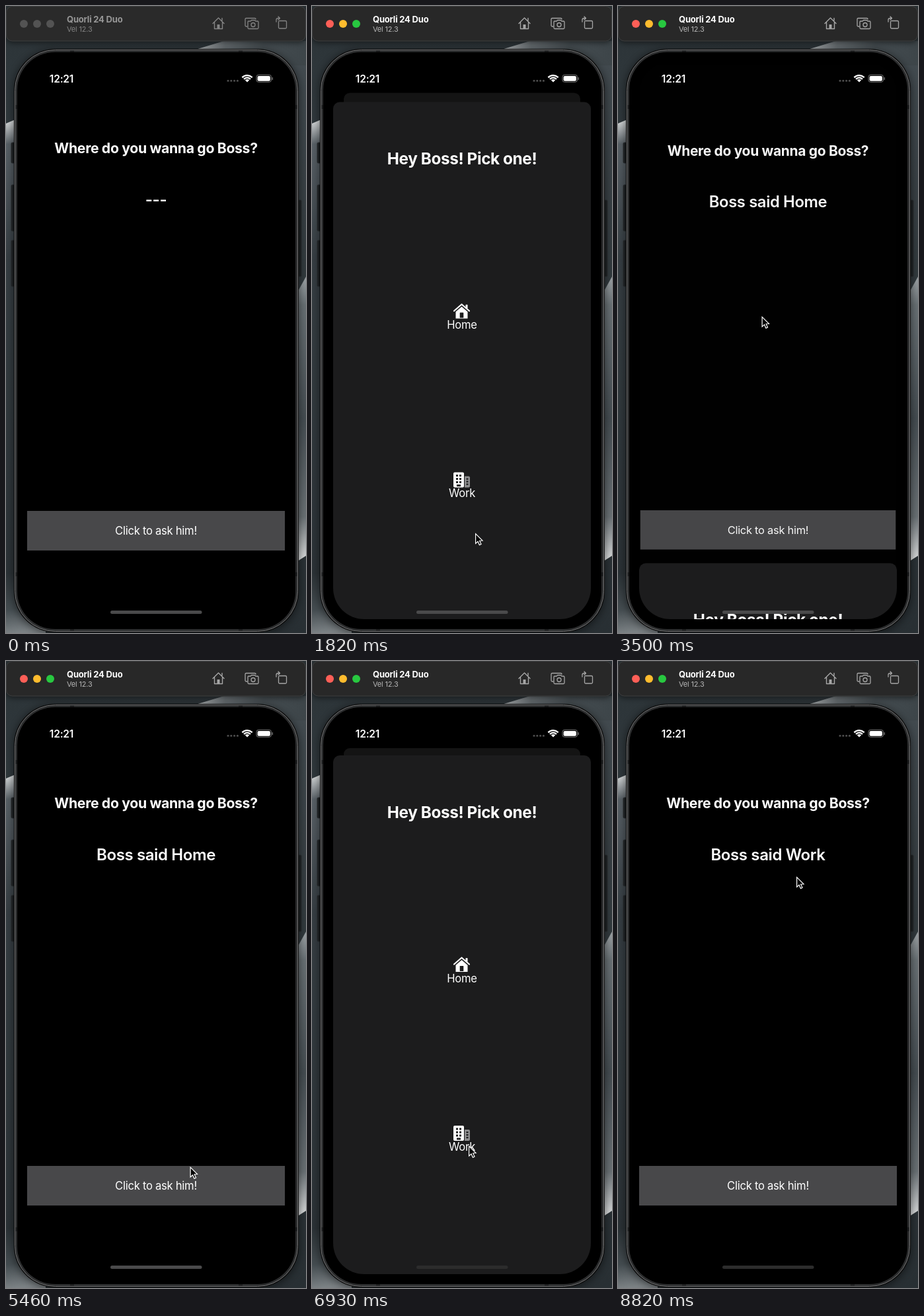
Animation, 454 px wide and 950 px high, one loop 8.89 s. Source, as an HTML page with a canvas:

```html
<!DOCTYPE html>
<html lang="en">
<head>
<meta charset="utf-8">
<title>Pick a place</title>
<style>
html, body { margin: 0; width: 100%; height: 100%; overflow: hidden; background: #000; }
canvas { display: block; width: 100%; height: 100%; }
</style>
</head>
<body>
<canvas id="stage" width="454" height="950"></canvas>
<script>
const ctx = document.getElementById('stage').getContext('2d');
const W = 454, H = 950, LOOP = 8890, STEP = 70;
const MID = 227, TOP = 85, BOTTOM = 929, SHEET_TOP = 143;
const FONT = 'Inter, "Liberation Sans", sans-serif';

const ACTIVATE = 1190;
const OPEN = [1290, 5790];
const CLOSE = [3247, 6967];
const CLICKS = [ACTIVATE, 3010, 5550, 6730];

// Pointer path: time, x, y of the tip
const PATH = [
  [140, 236, 916], [700, 247, 806], [770, 247, 806], [980, 248, 802],
  [1120, 248, 802], [1190, 247, 799], [2030, 247, 799], [2660, 214, 486],
  [2870, 217.5, 470.5], [4200, 217.5, 470.5], [5040, 336, 571], [5460, 278.5, 766.5],
  [5600, 270.5, 788.5], [6090, 270.5, 788.5], [6650, 237, 734.5], [7350, 237, 734.5],
  [7770, 268, 473], [8050, 282, 399], [8120, 282, 399], [8820, 270, 327]
];

function pointer(t) {
  let i = 1;
  while (i < PATH.length - 1 && t > PATH[i][0]) i++;
  const [t0, x0, y0] = PATH[i - 1], [t1, x1, y1] = PATH[i];
  const u = Math.min(1, Math.max(0, (t - t0) / (t1 - t0)));
  const e = smooth(u);
  return [x0 + (x1 - x0) * e, y0 + (y1 - y0) * e];
}

function smooth(u) {
  return u * u * (3 - 2 * u);
}

// Critically damped spring, 0 to 1
function spring(ms) {
  if (ms <= 0) return 0;
  const x = ms * 0.015;
  return 1 - (1 + x) * Math.exp(-x);
}

function shown(t) {
  return OPEN.reduce((p, start, i) => p + spring(t - start) - spring(t - CLOSE[i]), 0);
}

function box(x, y, w, h, r, fill) {
  ctx.beginPath();
  ctx.roundRect(x, y, w, h, r);
  if (fill) { ctx.fillStyle = fill; ctx.fill(); }
}

function disc(x, y, r, fill) {
  ctx.beginPath();
  ctx.arc(x, y, r, 0, Math.PI * 2);
  ctx.fillStyle = fill;
  ctx.fill();
}

function poly(points, fill) {
  ctx.beginPath();
  points.forEach(([x, y]) => ctx.lineTo(x, y));
  ctx.closePath();
  if (fill) { ctx.fillStyle = fill; ctx.fill(); }
}

function line(d, color, width) {
  ctx.strokeStyle = color;
  ctx.lineWidth = width;
  ctx.lineJoin = ctx.lineCap = 'round';
  ctx.stroke(new Path2D(d));
}

function text(s, x, y, size, weight, color = '#fff', align = 'center') {
  ctx.font = `${weight} ${size}px ${FONT}`;
  ctx.letterSpacing = `${-0.016 * size}px`;
  ctx.textAlign = align;
  ctx.fillStyle = color;
  ctx.fillText(s, x, y);
}

function fade(x0, y0, x1, y1, ...stops) {
  const g = ctx.createLinearGradient(x0, y0, x1, y1);
  stops.forEach(([at, c]) => g.addColorStop(at, c));
  return g;
}

function shaded(blur, paint) {
  ctx.save();
  ctx.shadowColor = 'rgba(0,0,0,0.55)';
  ctx.shadowBlur = blur;
  ctx.shadowOffsetY = 2;
  paint();
  ctx.restore();
}

function wallpaper() {
  ctx.fillStyle = fade(0, 53, 0, H, [0, '#2d3539'], [0.4, '#343c41'], [1, '#282f33']);
  ctx.fillRect(0, 0, W, H);
  poly([[287, 66], [330, 53], [W, 53], [W, 140], [287, 140]],
    fade(290, 60, W, 80, [0, '#b4b8ba'], [0.25, '#6a7175'], [0.6, '#454d51'], [1, '#3d4549']));
  ctx.fillStyle = fade(0, 90, 0, 400, [0, '#424a4f'], [1, '#323a3e']);
  ctx.fillRect(430, 90, 24, 350);
  poly([[0, 178], [14, 172], [40, 170], [40, 860], [0, 860]],
    fade(0, 175, 0, 860, [0, '#d4d7d8'], [0.05, '#596167'], [0.3, '#363e43'], [1, '#2b3236']));
  poly([[0, 860], [60, 860], [60, H], [0, H]],
    fade(0, 860, 14, H, [0, '#2b3236'], [0.6, '#444c50'], [1, '#7c8285']));
  poly([[W, 410], [443, 430], [420, 470], [420, 848], [443, 840], [W, 833]],
    fade(0, 410, 0, 838, [0, '#a0a6a9'], [0.1, '#697175'], [0.5, '#454d52'], [0.85, '#6b7276'], [1, '#dadcdd']));
}

function phoneBody() {
  const key = (x, y, h) => {
    box(x, y, 6, h, 1.5, '#1f2325');
    ctx.strokeStyle = '#2c3133';
    ctx.lineWidth = 1;
    ctx.stroke();
  };
  key(8, 207, 31);
  key(8, 271, 70);
  key(8, 355, 70);
  key(441, 294, 116);
  shaded(14, () => box(12, 65, 431, 884, 62, '#0b0b0b'));
  box(13.5, 66.5, 428, 881, 61, '#2c2d2e');
  ctx.strokeStyle = '#737475';
  ctx.lineWidth = 1;
  ctx.stroke();
  ctx.fillStyle = '#1d1e1f';
  for (const x of [97, 352]) { ctx.fillRect(x, 67, 6, 3); ctx.fillRect(x, 944, 6, 3); }
  for (const y of [150, 858]) { ctx.fillRect(14, y, 3, 6); ctx.fillRect(438, y, 3, 6); }
  box(17, 70, 421, 874, 57, '#000');
}

function toolbar(active) {
  shaded(10, () => box(0, 0, W, 53.5, 9, active ? '#282828' : '#2a2a2a'));
  box(0.5, 0.5, W - 1, 52.5, 9);
  ctx.strokeStyle = '#3c3e3f';
  ctx.lineWidth = 1;
  ctx.stroke();
  const lights = active ? ['#fe5f57', '#febc2e', '#28c840'] : ['#535353', '#535353', '#535353'];
  lights.forEach((c, i) => disc(27 + 20 * i, 27, 6, c));
  text('Quorli 24 Duo', 92, 25, 13, 700, active ? '#fff' : '#979797', 'left');
  text('Vel 12.3', 92, 39, 11, 400, active ? '#b5b5b5' : '#828282', 'left');
  const c = active ? '#a6a6a6' : '#848484';
  line('M313 26.5L321.500 18L330 26.500M315.500 25V34.500H327.500V25M327 22V18.500', c, 1.4);
  box(319.5, 28, 4, 6.5, 0.5, c);
  line('M365 31H363.500Q362 31 362 29.500V20Q362 18.500 363.500 18.500H376.500Q378 18.500 378 20', c, 1.3);
  line('M367 23H370L371.500 21.500H376.500L378 23H380.500Q382 23 382 24.500V33Q382 34.500 380.500 34.500H367.500Q366 34.500 366 33V24Q366 23 367 23Z', c, 1.3);
  line('M377 28.500A3 3 0 1 1 371 28.500A3 3 0 1 1 377 28.500', c, 1.3);
  line('M413.500 22.500H423Q424.500 22.500 424.500 24V32.500Q424.500 34 423 34H414Q412.500 34 412.500 32.500V23.500M409 24V21Q409 18.500 412 18.500H414M412 16L414.500 18.500L412 21', c, 1.3);
}

function statusBar() {
  text('12:21', 84, 115.5, 15.6, 600);
  for (let i = 0; i < 4; i++) disc(336 + 4.8 * i, 113.3, 1.5, '#4f4f4f');
  ctx.strokeStyle = '#fff';
  ctx.lineCap = 'butt';
  ctx.lineWidth = 2.3;
  for (const r of [10.4, 6.8]) {
    ctx.beginPath();
    ctx.arc(365, 115.5, r, -Math.PI * 0.76, -Math.PI * 0.24);
    ctx.stroke();
  }
  poly([[361.8, 112.3], [363.4, 111.3], [365, 111], [366.6, 111.3], [368.2, 112.3], [365, 115.6]], '#fff');
  box(379, 104.3, 22.5, 11, 3.3);
  ctx.strokeStyle = '#777';
  ctx.lineWidth = 1;
  ctx.stroke();
  box(380.6, 105.9, 19.3, 7.8, 2, '#fff');
  box(402.6, 108, 1.3, 4, 0.6, '#777');
}

function mainScreen(p, answer) {
  const k = 1 - 0.082 * p;
  ctx.save();
  ctx.translate(MID, TOP + 47 * p);
  ctx.scale(k, k);
  ctx.translate(-MID, -TOP);
  const g = Math.round(28 * smooth(p));
  box(32, TOP, 390, 844, p > 0.001 ? [10, 10, 0, 0] : 0, `rgb(${g},${g},${g})`);
  text('Where do you wanna go Boss?', MID, 223, 21.2, 700);
  text(answer, MID, 302, 24, 600);
  ctx.fillStyle = '#48484a';
  ctx.fillRect(32, 765, 390, 60);
  text('Click to ask him!', MID, 801, 16.6, 400);
  ctx.fillStyle = `rgba(0,0,0,${0.3 * p})`;
  ctx.fillRect(32, TOP, 390, 844);
  ctx.restore();
}

function houseIcon(x, y) {
  line(`M${x - 11.5} ${y + 11.5}L${x} ${y + 1.5}L${x + 11.5} ${y + 11.5}`, '#fff', 2.2);
  box(x + 6, y + 2, 3, 6, 0.8, '#fff');
  poly([[x, y + 5], [x + 9, y + 12.8], [x + 9, y + 23], [x - 9, y + 23], [x - 9, y + 12.8]], '#fff');
  box(x - 2.8, y + 14, 5.6, 8, 0.6, '#1c1c1d');
}

function officeIcon(x, y) {
  box(x, y, 16, 23, 2, '#fff');
  box(x + 17, y + 6, 8, 17, [0, 2, 2, 0], '#8d8d8e');
  for (let r = 0; r < 3; r++) {
    for (let c = 0; c < 2; c++) box(x + 4 + c * 5, y + 3.5 + r * 5, 3, 3, 0.4, '#1c1c1d');
    box(x + 19.5, y + 9 + r * 4, 3, 2.2, 0.4, '#1c1c1d');
  }
  box(x + 5, y + 18.5, 6, 3, 0.4, '#1c1c1d');
}

function sheet(p) {
  if (p < 0.001) return;
  const y = BOTTOM + (SHEET_TOP - BOTTOM) * p;
  box(32, y, 390, 844, 10, '#1c1c1d');
  text('Hey Boss! Pick one!', MID, y + 94.5, 24.3, 700);
  houseIcon(226.5, y + 305);
  text('Home', MID, y + 344, 16.6, 400);
  officeIcon(214, y + 561);
  text('Work', MID, y + 599, 16.6, 400);
}

function homeBar(t) {
  box(158, 916, 138.5, 5, 2.5, t < OPEN[1] ? '#4a4a4b' : '#2c2c2c');
}

function arrow(t) {
  if (t < 140) return;
  const [x, y] = pointer(t);
  if (CLICKS.some(c => t >= c && t < c + 140)) {
    ctx.beginPath();
    ctx.arc(x, y, 22.5, 0, Math.PI * 2);
    ctx.strokeStyle = 'rgba(0,0,0,0.75)';
    ctx.lineWidth = 2.5;
    ctx.stroke();
  }
  const shape = [[0.6, 0.6], [0.6, 15.4], [4, 12.2], [6.4, 17.6], [9, 16.5], [6.6, 11.2], [11, 11]];
  poly(shape.map(([dx, dy]) => [x + dx, y + dy]), '#000');
  ctx.strokeStyle = '#fff';
  ctx.lineWidth = 1.2;
  ctx.lineJoin = 'miter';
  ctx.stroke();
}

function draw(t) {
  const p = shown(t);
  const answer = t < CLOSE[0] ? '---' : t < CLOSE[1] ? 'Boss said Home' : 'Boss said Work';
  wallpaper();
  phoneBody();
  toolbar(t >= ACTIVATE);
  ctx.save();
  box(32, TOP, 390, 844, 47);
  ctx.clip();
  mainScreen(p, answer);
  sheet(p);
  ctx.restore();
  statusBar();
  homeBar(t);
  arrow(t);
}

const begin = performance.now();
function tick() {
  const t = (performance.now() - begin) % LOOP;
  draw(Math.floor(t / STEP) * STEP);
  requestAnimationFrame(tick);
}
tick();
</script>
</body>
</html>
```
